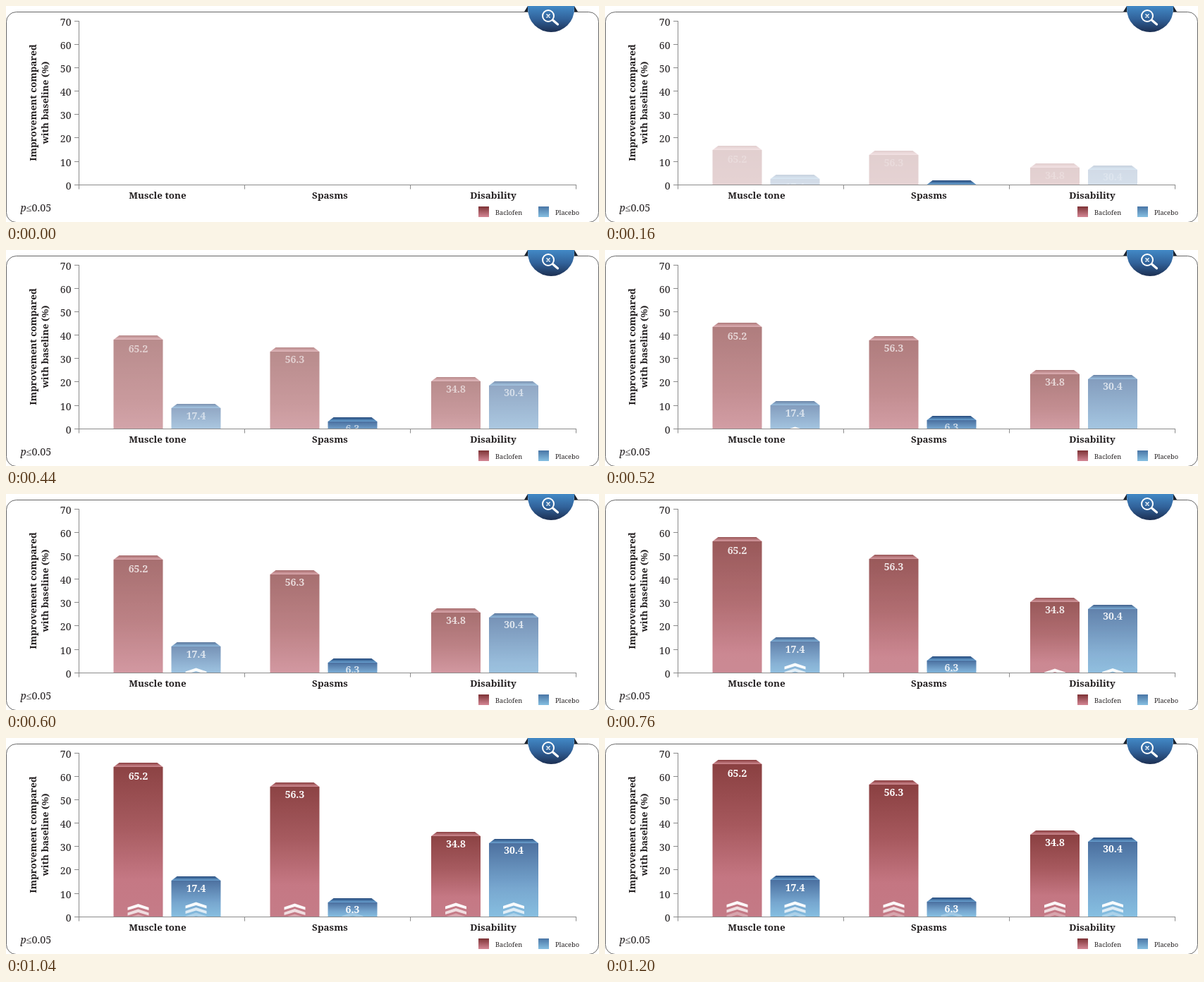
Animation of 841x306 px, one loop 6000 ms. Source, as an HTML page:

```html
<!DOCTYPE html>
<html lang="en">
<head>
<meta charset="utf-8">
<title>Improvement compared with baseline</title>
<style>
  html, body { margin: 0; width: 100%; height: 100%; overflow: hidden; background: #fff; }
  svg { display: block; width: 841px; height: 306px; font-family: "Noto Serif", serif; fill: #231f20; }
  .bold { font-weight: 700; font-size: 13.4px; text-anchor: middle; }
  .num { font-size: 14px; text-anchor: end; }
  .value { font-weight: 700; font-size: 14px; text-anchor: middle; fill: #fff; }
  .key { font-size: 9.2px; }
</style>
</head>
<body>
<svg id="stage" viewBox="0 0 841 306">
  <defs>
    <linearGradient id="red" x2="0" y2="1">
      <stop stop-color="#8a4041"/><stop offset=".4" stop-color="#a6585d"/>
      <stop offset=".74" stop-color="#c47682"/><stop offset="1" stop-color="#c47a86"/>
    </linearGradient>
    <linearGradient id="blue" x2="0" y2="1">
      <stop stop-color="#4a6f9f"/><stop offset=".6" stop-color="#76a6cf"/><stop offset="1" stop-color="#86bfe1"/>
    </linearGradient>
    <linearGradient id="redCap" x2="0" y2="1">
      <stop stop-color="#893b3d"/><stop offset="1" stop-color="#cf8b92"/>
    </linearGradient>
    <linearGradient id="blueCap" x2="0" y2="1">
      <stop stop-color="#24487a"/><stop offset="1" stop-color="#6ba3d2"/>
    </linearGradient>
    <linearGradient id="redKey" x2="0" y2="1">
      <stop stop-color="#7d3235"/><stop offset="1" stop-color="#d48795"/>
    </linearGradient>
    <linearGradient id="blueKey" x2="0" y2="1">
      <stop stop-color="#4a76a6"/><stop offset="1" stop-color="#86bfe1"/>
    </linearGradient>
    <linearGradient id="badge" x2="0" y2="1">
      <stop stop-color="#4289c6"/><stop offset=".5" stop-color="#31629a"/><stop offset="1" stop-color="#1c2f52"/>
    </linearGradient>
    <clipPath id="plot"><rect width="841" height="253"/></clipPath>
  </defs>

  <rect x=".5" y="8.5" width="840" height="298" rx="14" fill="#fff" stroke="#555" stroke-width=".9"/>

  <path d="M740 0L735 8H740ZM806 0L811 8H806Z" fill="#1c2430"/>
  <path d="M740 0H806V4A33 33 0 0 1 740 4Z" fill="url(#badge)"/>
  <g fill="none" stroke="#fff" stroke-linecap="round">
    <circle cx="769" cy="14" r="8" stroke-width="2"/>
    <path d="M775.5 20L782.5 26" stroke-width="3.2"/>
    <path d="M767 12l4 4m0 -4l-4 4" stroke-width="1.6"/>
  </g>

  <g id="bars" clip-path="url(#plot)"></g>
  <g id="axes"></g>

  <g class="bold">
    <text transform="translate(42.5 137) rotate(-90)">Improvement compared</text>
    <text transform="translate(60 137) rotate(-90)">with baseline (%)</text>
    <text x="215" y="273">Muscle tone</text>
    <text x="459.5" y="273">Spasms</text>
    <text x="691" y="273">Disability</text>
  </g>
  <text x="20.5" y="291" font-size="14.3"><tspan font-style="italic">p</tspan>≤0.05</text>

  <rect x="670" y="284" width="15" height="15" fill="url(#redKey)"/>
  <text class="key" x="694" y="295.5">Baclofen</text>
  <rect x="755" y="284" width="15" height="15" fill="url(#blueKey)"/>
  <text class="key" x="779" y="295.5">Placebo</text>
</svg>
<script>
const BASE = 253, WIDTH = 70, CAP = 6;
const LOOP = 6000, GROW = 1200, STEP = 40;

// left edge, full height, value, colour, label baseline below the top
const bars = [
  { x: 152.5, h: 222, value: "65.2", hue: "red", label: 24 },
  { x: 234.5, h: 58.5, value: "17.4", hue: "blue", label: 22 },
  { x: 374.5, h: 193.5, value: "56.3", hue: "red", label: 22 },
  { x: 456.5, h: 27, value: "6.3", hue: "blue", label: 20.5, solid: true },
  { x: 603, h: 122.5, value: "34.8", hue: "red", label: 22 },
  { x: 685, h: 112, value: "30.4", hue: "blue", label: 20.5 }
];

const chevron = (y, opacity) =>
  `<path transform="translate(35 ${y})" d="M-15 5L0 0L15 5V9L0 4.5L-15 9Z" fill="#fff" opacity="${opacity}"/>`;

function barMarkup({ h, value, hue, label, solid }) {
  const marks = solid ? [[20, 0.25]] : [[h - 22, 0.95], [h - 14.5, 0.75], [h - 7, 0.32]];
  return `<g>
    <rect y="${CAP}" width="${WIDTH}" height="${h - CAP}" fill="url(#${hue})"/>
    <path d="M0 ${CAP}L8 0H${WIDTH - 8}L${WIDTH} ${CAP}Z" fill="url(#${hue}Cap)"/>
    ${marks.map(m => chevron(...m)).join("")}
    <text class="value" x="35" y="${label}">${value}</text>
  </g>`;
}

function axesMarkup() {
  let path = `M103.5 21V${BASE + 0.5}H809`, text = "";
  for (let n = 0; n <= 70; n += 10) {
    const y = Math.round(21 + (70 - n) * 3.309) + 0.5;
    path += `M97 ${y}H103.5`;
    text += `<text class="num" x="92.5" y="${y + 6}">${n}</text>`;
  }
  for (const x of [103.5, 338.5, 573.5, 808.5]) path += `M${x} ${BASE}V259.5`;
  return `<path d="${path}" fill="none" stroke="#8b8b8b"/>${text}`;
}

const layer = document.getElementById("bars");
layer.innerHTML = bars.map(barMarkup).join("");
document.getElementById("axes").innerHTML = axesMarkup();
const nodes = [...layer.children];
const labels = nodes.map(node => node.querySelector("text"));

function draw(ms) {
  const t = Math.min(1, Math.floor(ms / STEP) * STEP / GROW);
  const p = 1 - (1 - t) ** 2;
  bars.forEach((bar, i) => {
    nodes[i].setAttribute("transform", `translate(${bar.x} ${BASE - Math.floor(bar.h * p)})`);
    nodes[i].setAttribute("opacity", bar.solid && t > 0 ? 1 : p);
    labels[i].setAttribute("opacity", p);
  });
}

const start = performance.now();
function tick() {
  draw((performance.now() - start) % LOOP);
  requestAnimationFrame(tick);
}
draw(0);
requestAnimationFrame(tick);
</script>
</body>
</html>
```
